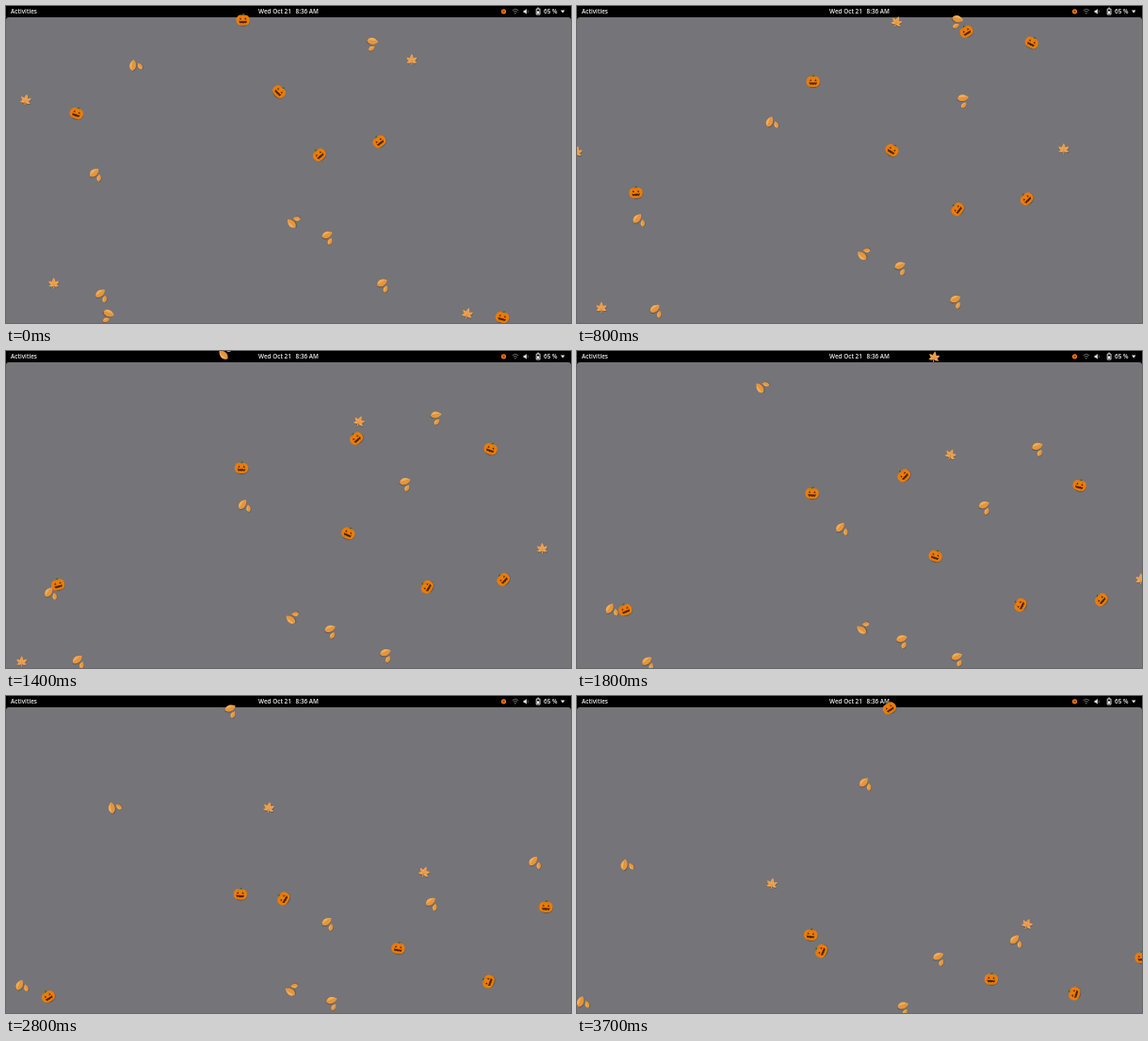
An HTML page for the animation above (3800 ms loop, 600x337 px).

```html
<!DOCTYPE html>
<html lang="en">
<head>
<meta charset="utf-8">
<title>Autumn desktop</title>
<style>
  html, body { margin: 0; width: 100%; height: 100%; overflow: hidden; background: #000; }
  svg { display: block; width: 100vw; height: 100vh; }
  text { font: 600 6.4px "Open Sans", "Noto Sans", sans-serif; fill: #eee; white-space: pre; }
</style>
</head>
<body>
<svg viewBox="0 0 600 337" preserveAspectRatio="none">
  <defs>
    <linearGradient id="leafFill" x1="0" x2="1">
      <stop offset="0" stop-color="#fab45c"/>
      <stop offset="1" stop-color="#e08a2c"/>
    </linearGradient>

    <g id="pumpkin">
      <ellipse cx=".4" cy="1.2" rx="7.2" ry="5.7" fill="#3a3330" opacity=".4"/>
      <path d="M-1-4.4Q-.8-6 .2-7L1.8-6.6Q1-5.8 1.2-4.4Z" fill="#3f6a2a"/>
      <path d="M0-4.9C3-6.4 7.2-4.6 7.2 .2C7.2 4.6 4 6.2 0 5.7C-4 6.2-7.2 4.6-7.2 .2C-7.2-4.6-3-6.4 0-4.9Z" fill="#ec7c08"/>
      <path d="M-2-5Q-4.6 0-2 5.5M2-5Q4.6 0 2 5.5" fill="none" stroke="#cf6706" stroke-width=".5"/>
      <path d="M-3.9-.6L-2.6-2.3L-1.4-.6ZM1.4-.6L2.6-2.3L3.9-.6ZM-4.4 1L-2.2 1.3L-1.2 .9L0 1.3L1.2 .9L2.2 1.3L4.4 1L3.4 3.3L1.6 3L0 3.5L-1.6 3L-3.4 3.3Z"
            fill="#4a2506"/>
    </g>

    <path id="blade" d="M.4-6.2C4.6-2.8 5 3 0 5.8C-4.6 3.4-4.6-2 .4-6.2Z"/>
    <g id="leaf">
      <use href="#blade" x=".7" y=".8" fill="#3a3330" opacity=".4"/>
      <use href="#blade" fill="url(#leafFill)"/>
      <path d="M.2-4.5L0 5.8" stroke="#cc7d2c" stroke-width=".5"/>
    </g>
    <g id="pair">
      <use href="#leaf" transform="translate(-3.2 0)"/>
      <use href="#leaf" transform="translate(4.6 .4) rotate(-42) scale(.64)"/>
    </g>

    <path id="lobe" d="M0 1C-2.6-1.5-2.2-4.5 0-7.6C2.2-4.5 2.6-1.5 0 1Z"/>
    <g id="star">
      <use href="#lobe"/>
      <use href="#lobe" transform="rotate(54) scale(.9)"/>
      <use href="#lobe" transform="rotate(-54) scale(.9)"/>
      <use href="#lobe" transform="rotate(106) scale(.75)"/>
      <use href="#lobe" transform="rotate(-106) scale(.75)"/>
      <path d="M-.4 0H.4V4H-.4Z"/>
    </g>
    <g id="maple">
      <use href="#star" x=".5" y="2.3" fill="#3a3330" opacity=".4"/>
      <use href="#star" y="1.5" fill="#f2a552"/>
      <path d="M0 4V-4M0 2L4-1M0 2L-4-1" fill="none" stroke="#cc8234" stroke-width=".4"/>
    </g>
  </defs>

  <rect width="600" height="337" fill="#000"/>
  <path d="M0 337V15Q0 12 3 12H597Q600 12 600 15V337Z" fill="#757478"/>

  <text x="5" y="8.4">Activities</text>
  <text x="268" y="8.4">Wed Oct 21</text>
  <text x="307.5" y="8.4">8:36 AM</text>
  <text x="571" y="8.4">65 %</text>

  <circle cx="528.5" cy="5.8" r="2" fill="#a04a00" stroke="#ff7a12" stroke-width="1.2"/>
  <g fill="none" stroke="#777" stroke-width=".9">
    <path d="M537.6 4.6Q540.8 1.9 544 4.6M538.8 6.2Q540.8 4.6 542.8 6.2"/>
    <circle cx="540.8" cy="7.8" r=".5"/>
  </g>
  <path d="M549.6 4.8H551L552.8 3V8.8L551 7H549.6Z" fill="#eee"/>
  <path d="M553.8 4.4Q555 5.9 553.8 7.4" fill="none" stroke="#888" stroke-width=".7"/>
  <path d="M563.2 3.1H567V9H563.2ZM564.2 2.2H566" fill="none" stroke="#eee" stroke-width=".9"/>
  <path d="M564 5.4H566.2V8.2H564Z" fill="#eee"/>
  <path d="M589 4.6H593.4L591.2 7.4Z" fill="#eee"/>

  <g id="fall"></g>
</svg>

<script>
const LOOP = 3800, STEP = 100;
const TOP = -10, GROUND = 332;

const layer = document.getElementById('fall');
const items = [];

// Falls from TOP to the ground in `time` ms, slowing evenly until it lands and vanishes.
function drop(shape, land, time, from, to, tilt, turn = 0, ground = GROUND) {
  const el = document.createElementNS('http://www.w3.org/2000/svg', 'use');
  el.setAttribute('href', '#' + shape);
  layer.append(el);
  items.push(t => {
    const rest = ((land - t) / time) ** 2;
    const x = to + (from - to) * rest;
    const y = ground + (TOP - ground) * rest;
    el.setAttribute('visibility', t < land ? 'visible' : 'hidden');
    el.setAttribute('transform', `translate(${x} ${y}) rotate(${tilt - turn * rest})`);
  });
}

drop('maple', 6320, 7670, 63, -68, 12);
drop('maple', 4195, 4680, 370, 680, 0);
drop('maple', 1790, 5440, 345, 15, 0);
drop('maple', 700, 5780, 490, 490, 16);
drop('maple', 7006, 6465, 323, 533, 22);
drop('maple', 7044, 5375, 394, 89, 10);

drop('pair', 6635, 7486, 54, 445, 75, 90);
drop('pair', 7311, 7919, 371, 492, 25, -81);
drop('pair', 4608, 6900, 211, 3, 18, -63);
drop('pair', 3690, 7118, 311, 303.5, -60, -52, 317);
drop('pair', 3760, 7498, 328, 347, 70, 30);
drop('pair', 2780, 8680, 365, 405, 68, 100);
drop('pair', 1880, 7090, 446, 76, 50);
drop('pair', 600, 7100, 108, 108, 108);
drop('pair', 7473, 6951, 377, 715, -26, -139);
drop('pair', 8552, 7280, 245, -100, 56, 109);
drop('pair', 9612, 7084, 217, 513, -37, -110);

drop('pumpkin', 7342, 7625, 252, 247, 8, 10);
drop('pumpkin', 3680, 4610, 93, 43, -36, -85);
drop('pumpkin', 5770, 6874, 218, 462, -4, -70);
drop('pumpkin', 3950, 5667, 125, 529, -72, -62, 317);
drop('pumpkin', 4500, 6070, 191, 647, -56, -33);
drop('pumpkin', 400, 7000, 527, 527, 14);
drop('pumpkin', 6043, 5553, 437, 221, -76, -50);
drop('pumpkin', 5880, 5487, 459, 626, -12, -47);
drop('pumpkin', 9496, 6000, 334, 300, -34);

const begin = performance.now();
function tick() {
  const t = (performance.now() - begin) % LOOP;
  const held = Math.floor(t / STEP) * STEP;
  for (const place of items) place(held);
  requestAnimationFrame(tick);
}
tick();
</script>
</body>
</html>
```
